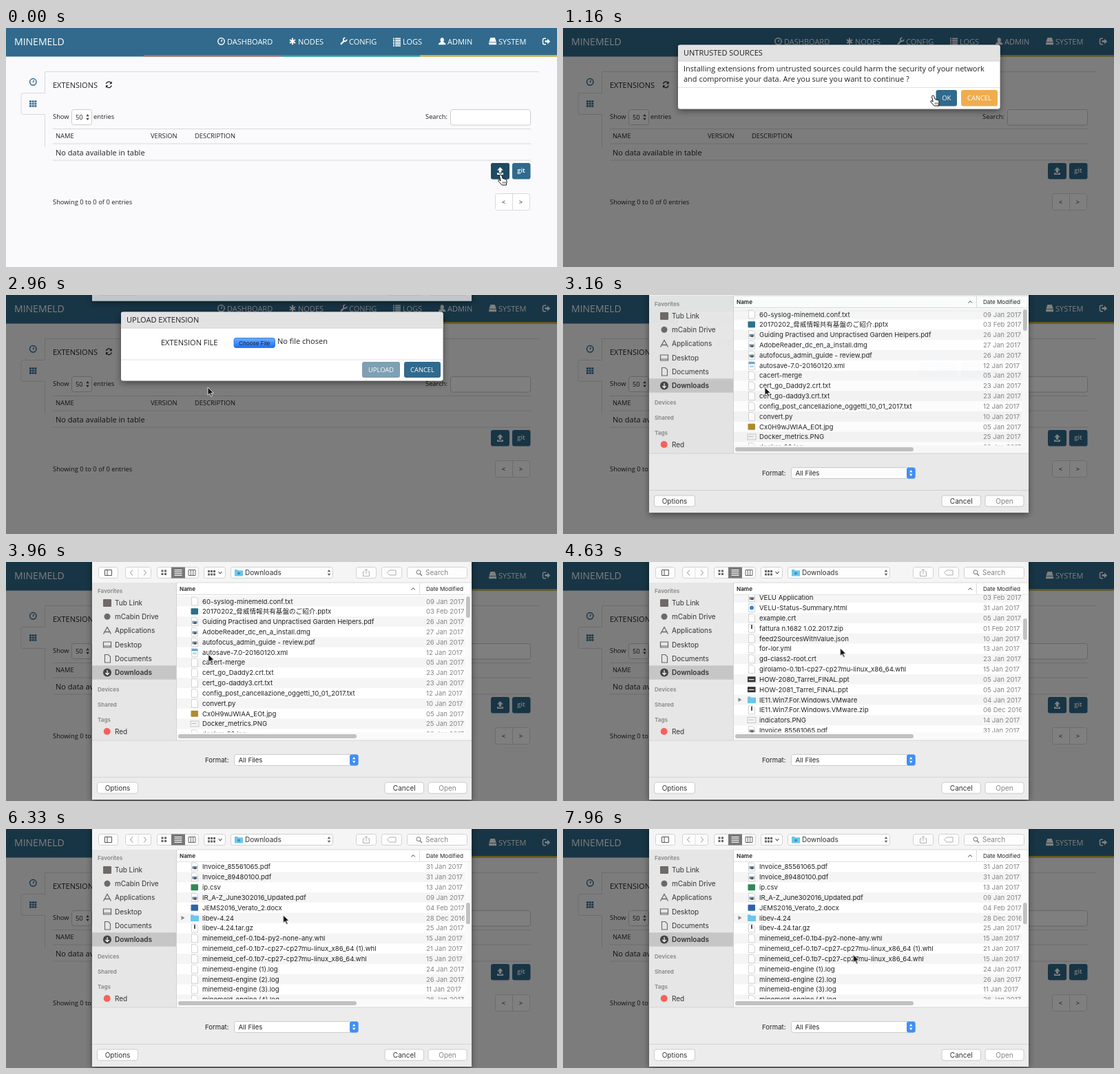
These frames come from a looping animation (800x347 px, 8000 ms). An HTML page:

```html
<!DOCTYPE html>
<html lang="en">
<head>
<meta charset="utf-8">
<title>Extension upload</title>
<style>
@property --scroll { syntax: '<number>'; inherits: true; initial-value: 0; }
html, body { margin: 0; width: 100%; height: 100%; overflow: hidden; background: #fafafc; }
svg { display: block; width: 100vw; height: 100vh; }
text { font: 9.35px 'Open Sans', sans-serif; fill: #222; white-space: pre; }
.big { font-size: 11px; }
.brand { font-size: 14px; }
.white { fill: #fff; }
.mac { font: 9.6px Inter, 'Noto Sans CJK JP', 'Noto Sans CJK', sans-serif; }
.side { font-size: 10px; fill: #333; }
.head { font-size: 8.15px; }
.bold { font-weight: 600; }
.grey { fill: #858585; }
.mid { text-anchor: middle; }
.anim { animation: 8s linear infinite; }

#hover { animation-name: hover; }
@keyframes hover { 0%, 4.5% { opacity: 1 } 6%, 100% { opacity: 0 } }
#shade { animation-name: shade; }
@keyframes shade {
  0%, 4% { opacity: 0 } 6%, 15.7% { opacity: 1 }
  18%, 19.5% { opacity: 0 } 21.5%, 100% { opacity: 1 }
}
#warn { animation-name: warn; }
@keyframes warn {
  0%, 5% { opacity: 0; transform: translateY(-87px); animation-timing-function: ease-out }
  9%, 15% { opacity: 1; transform: none; animation-timing-function: ease-out }
  18%, 100% { opacity: 0; transform: translateY(-87px) }
}
#upload { animation-name: upload; }
@keyframes upload {
  0%, 19.8% { opacity: 0; transform: translateY(-87px); animation-timing-function: ease-out }
  23.6%, 100% { opacity: 1; transform: none }
}
#pressed { animation-name: pressed; }
@keyframes pressed { 0%, 29% { opacity: 0 } 29.01%, 100% { opacity: 1 } }
#sheet { animation-name: sheet; }
@keyframes sheet {
  0%, 36% { transform: translateY(-360px); opacity: .8 }
  36.01% { transform: translateY(-346px); opacity: .8 }
  37% { transform: translateY(-337px); opacity: .8; animation-timing-function: cubic-bezier(.35, .25, .35, 1) }
  40.75%, 100% { transform: none; opacity: 1 }
}
#list { animation-name: scroll; }
@keyframes scroll {
  0%, 55.5% { --scroll: 0 }
  57.875% { --scroll: 242.3; animation-timing-function: ease-out }
  62.5%, 65.5% { --scroll: 300 }
  67% { --scroll: 338.1; animation-timing-function: ease-out }
  68.75%, 76.75% { --scroll: 352; animation-timing-function: ease-out }
  79.125%, 100% { --scroll: 432.1 }
}
#rows { transform: translateY(calc(var(--scroll) * -1px)); }
#thumb { transform: translateY(calc(var(--scroll) * .132px)); }
#cursor { animation-name: cursor; animation-timing-function: ease-in-out; }
@keyframes cursor {
  0%, 5% { transform: translate(718px, 213px) }
  13.5%, 19% { transform: translate(537px, 98px) }
  24.25% { transform: translate(413px, 84px) }
  28%, 31% { transform: translate(352px, 66px) }
  34.5%, 35% { transform: translate(281px, 122px) }
  37%, 49.25% { transform: translate(293px, 134px) }
  53.75%, 83% { transform: translate(402.5px, 125px) }
  90.75%, 98% { transform: translate(413px, 156px) }
  99.5%, 100% { transform: translate(421.5px, 182.5px) }
}
#hand { animation-name: hand; }
@keyframes hand { 0%, 5% { opacity: 1 } 5.01%, 12.5% { opacity: 0 } 12.51%, 17% { opacity: 1 } 17.01%, 100% { opacity: 0 } }
#arrow { animation-name: arrow; }
@keyframes arrow { 0%, 5% { opacity: 0 } 5.01%, 12.5% { opacity: 1 } 12.51%, 17% { opacity: 0 } 17.01%, 100% { opacity: 1 } }
</style>
</head>
<body>
<svg id="stage" viewBox="0 0 800 347" preserveAspectRatio="none"></svg>
<script>
const BLUE = '#316a8c', INK = '#222', LINE = '#d9d9dc';
const text = (x, y, s, cls = '') => `<text x="${x}" y="${y}" class="${cls}">${s}</text>`;
const rect = (x, y, w, h, fill, extra = '') =>
  `<rect x="${x}" y="${y}" width="${w}" height="${h}" fill="${fill}" ${extra}/>`;
const box = (x, y, w, h, r = 3, fill = '#fff', stroke = '#ccc') =>
  rect(x + .5, y + .5, w - 1, h - 1, fill, `rx="${r}" stroke="${stroke}"`);
const path = (d, stroke, width = 1, fill = 'none') =>
  `<path d="${d}" stroke="${stroke}" stroke-width="${width}" fill="${fill}"/>`;
const solid = (d, fill) => `<path d="${d}" fill="${fill}"/>`;
const circle = (x, y, r, fill, extra = '') => `<circle cx="${x}" cy="${y}" r="${r}" fill="${fill}" ${extra}/>`;
const group = (id, inner, attrs = '') => `<g id="${id}" class="anim" ${attrs}>${inner}</g>`;
const button = (x, y, w, h, label, fill) =>
  rect(x, y, w, h, fill, 'rx="3"') + text(x + w / 2, y + h / 2 + 3.4, label, 'white mid');
const updown = (x, y, c) => solid(`M${x - 2.3} ${y - 1.2}h4.6l-2.3-3.2zM${x - 2.3} ${y + 1.2}h4.6l-2.3 3.2z`, c);
const gauge = (x, y, c) => circle(x, y, 4.7, 'none', `stroke="${c}" stroke-width="1.5"`) +
  path(`M${x} ${y + 1}l1.2-3.6`, c, 1.3);
const uploadIcon = solid('M717.5 202l4.3 4.6h-2.6v3.4h-3.4v-3.4h-2.6zM713 210.3h2v1h5v-1h2v2.7h-9z', '#fff');

function header() {
  const items = [[321, 'DASHBOARD'], [424, 'NODES'], [498, 'CONFIG'], [576, 'LOGS'], [641, 'ADMIN'], [715, 'SYSTEM']];
  let out = rect(0, 0, 800, 41.5, BLUE);
  [[200, '#bd6a64'], [400, '#2ba59a'], [601, '#e6bd2f']].forEach(([x, c]) => out += rect(x, 39.3, 200.5, 2.2, c));
  out += text(12, 25, 'MINEMELD', 'brand white') + items.map(([x, s]) => text(x, 23.5, s, 'big white')).join('');
  out += gauge(312.5, 19.3, '#fff');
  out += path('M416 14.6v9.6M412 17l8 4.8M420 17l-8 4.8', '#fff', 2);
  out += path('M486 23.6l5.4-5.4', '#fff', 2.3) + path('M494.8 16.6a2.5 2.5 0 1 1-2.3-2.3', '#fff', 1.8);
  for (let y = 14.5; y < 25; y += 2.6) out += rect(562, y, 2, 1.7, '#fff') + rect(565, y, 8, 1.7, '#fff');
  out += solid('M633.2 14a2.8 3.2 0 0 1 1.3 6q4 1.2 4 4.3h-10.6q0-3.1 4-4.3a2.8 3.2 0 0 1 1.3-6z', '#fff');
  out += solid('M703.4 14h6.4l2 6h-10.4zM701.2 20.7h10.8v3.6h-10.8z', '#fff');
  return out + path('M784 15.2h-2.5q-2 0-2 2v4.5q0 2 2 2h2.5', '#fff', 1.5) +
    solid('M782.5 18h3.6v-2.6l4 4-4 4v-2.6h-3.6z', '#fff');
}

function page() {
  let out = rect(0, 0, 800, 347, '#fafafc') + header();
  out += path('M774 63.5H56.5V94.5H25q-3 0-3 3v25q0 3 3 3h31.5V173', LINE);
  out += gauge(39.3, 78.3, BLUE);
  for (let i = 0; i < 9; i++) out += rect(34 + i % 3 * 3.7, 105.3 + (i / 3 | 0) * 3.4, 2.9, 2.6, BLUE);
  out += text(68, 86.5, 'EXTENSIONS', 'big');
  out += path('M145.4 81.2a4 4 0 0 1 7-1.8M153.2 83.4a4 4 0 0 1-7 1.8', INK, 1.3) +
    solid('M153.7 77.5v3.7h-3.7zM144.9 87v-3.7h3.7z', INK);
  out += text(68, 132, 'Show') + box(95, 118, 30, 23) + text(101, 132.7, '50') + updown(118.5, 129.5, '#444') + text(127, 132, 'entries');
  out += text(609, 132, 'Search:') + box(645, 118, 117, 23.5);
  out += path('M68 146.5H762M68 168H762M68 192H762', LINE);
  out += text(72, 160, 'NAME') + text(210, 160, 'VERSION') + text(274, 160, 'DESCRIPTION');
  out += text(72, 184.5, 'No data available in table', 'big');
  out += rect(704, 196, 27, 23.5, BLUE, 'rx="3"') + group('hover', rect(704, 196, 27, 23.5, '#1f4a63', 'rx="3"')) + uploadIcon;
  out += rect(735, 196, 26.5, 23.5, BLUE, 'rx="3"') + text(748, 210, 'git', 'white mid bold');
  out += text(68, 255.5, 'Showing 0 to 0 of 0 entries') + box(710, 240, 51, 25, 3, '#fff', LINE) + path('M735.5 240v25', LINE);
  return out + text(722.5, 256, '&lt;', 'mid') + text(747.5, 256, '&gt;', 'mid');
}

function modal(h, title) {
  return rect(167, 24.5, 467.5, h, '#fff', 'rx="3" filter="url(#soft)"') +
    rect(167, 25, 467.5, 23, '#e2e2e3', 'rx="2"') + path('M167 48H634.5', '#d0d0d0') +
    text(175, 40, title, 'big');
}
const warning = () => modal(93, 'UNTRUSTED SOURCES') +
  text(175, 63, 'Installing extensions from untrusted sources could harm the security of your network', 'big') +
  text(175, 78, 'and compromise your data. Are you sure you want to continue ?', 'big') +
  path('M167 86.5H634.5', '#e2e2e2') +
  button(541.5, 90, 30.5, 23.5, 'OK', BLUE) + button(578, 90, 53, 23.5, 'CANCEL', '#f0ad4e');
const uploader = () => modal(100, 'UPLOAD EXTENSION') + text(225, 73, 'EXTENSION FILE', 'big') +
  box(331, 62, 59, 14.5, 3, '#f6f6f6', '#bbb') +
  group('pressed', rect(331, 62.5, 59.5, 14, 'url(#press)', 'rx="3" stroke="#2265cf" stroke-width=".7"')) +
  text(360.7, 72.7, 'Choose File', 'mac head mid') + text(394, 71.3, 'No file chosen', 'big') +
  path('M167 94H634.5', '#e2e2e2') +
  button(517, 97, 55, 23, 'UPLOAD', '#7f9fb3') + button(578, 97, 53, 23, 'CANCEL', BLUE);

// kind | name | day and month (2017 unless a year is given)
const FILES = `t|60-syslog-minemeld.conf.txt|09 Jan
#27708a|20170202_脅威情報共有基盤のご紹介.pptx|03 Feb
p|Guiding Practised and Unpractised Garden Helpers.pdf|26 Jan
p|AdobeReader_dc_en_a_install.dmg|27 Jan
p|autofocus_admin_guide - review.pdf|26 Jan
x|autosave-7.0-20160120.xml|12 Jan
t|cacert-merge|05 Jan
t|cert_go_Daddy2.crt.txt|23 Jan
t|cert_go-daddy3.crt.txt|23 Jan
t|config_post_cancellazione_oggetti_10_01_2017.txt|12 Jan
t|convert.py|10 Jan
#b08a2c|Cx0H9wJWIAA_EOt.jpg|05 Jan
i|Docker_metrics.PNG|25 Jan
t|docker-00.log|26 Jan
t|domains.txt|19 Jan
t|endpoints.json|11 Jan
p|VELU Application|03 Feb
c|VELU-Status-Summary.html|31 Jan
t|example.crt|05 Jan
z|fattura n.1682 1.02.2017.zip|01 Feb
t|feed2SourcesWithValue.json|10 Jan
t|for-lor.yml|13 Jan
t|gd-class2-root.crt|23 Jan
t|girolamo-0.1b1-cp27-cp27mu-linux_x86_64.whl|15 Jan
s|HOW-2080_Tarrel_FINAL.ppt|05 Jan
s|HOW-2081_Tarrel_FINAL.ppt|05 Jan
d|IE11.Win7.For.Windows.VMware|04 Jan
z|IE11.Win7.For.Windows.VMware.zip|06 Dec 2016
i|indicators.PNG|14 Jan
p|Invoice_85561065.pdf|31 Jan
p|Invoice_89480100.pdf|31 Jan
#2f8a55|ip.csv|13 Jan
p|IR_A-Z_June302016_Updated.pdf|09 Jan
#2f62ad|JEMS2016_Verato_2.docx|04 Feb
d|libev-4.24|28 Dec 2016
z|libev-4.24.tar.gz|25 Jan
t|minemeld_cef-0.1b4-py2-none-any.whl|15 Jan
t|minemeld_cef-0.1b7-cp27-cp27mu-linux_x86_64 (1).whl|21 Jan
t|minemeld_cef-0.1b7-cp27-cp27mu-linux_x86_64.whl|15 Jan
t|minemeld-engine (1).log|24 Jan
t|minemeld-engine (2).log|26 Jan
t|minemeld-engine (3).log|11 Jan
t|minemeld-engine (4).log|26 Jan
t|minemeld-engine (5).log|26 Jan`.split('\n').map(l => l.split('|'));

const folder = (x, y) => solid(`M${x} ${y - 4.5}h4l1 1.2h7v8.3h-12z`, '#6cc5ec');
function fileIcon(kind, y) {
  if (kind[0] === '#') return rect(268.5, y - 4.5, 10.5, 9, kind, 'rx="1"');
  if (kind === 'd') return folder(268, y) + solid(`M254.5 ${y - 3}l5 3-5 3z`, '#888');
  if (kind === 's') return rect(268, y - 4, 11.5, 8, '#333') + rect(269.5, y - .5, 8, 1.5, '#ddd');
  if (kind === 'i') return rect(268, y - 4, 12, 8, '#f4f4f4', 'stroke="#aaa" stroke-width=".6"') + rect(269.5, y - 1, 7, 1, '#bbb');
  let out = path(`M269.5 ${y - 6}h6l3 3v9h-9z`, '#c0c0c0', .7, '#fff');
  if (kind === 'p') out += rect(270.5, y - 1, 7, 4, '#7a8ea6') + circle(274.5, y + 2, 1.6, '#455');
  if (kind === 'x') out += rect(269.5, y - 5, 9, 3, '#55a5d8') + rect(271, y, 6, 3, '#bcd9ea');
  if (kind === 'c') out += circle(274, y, 3, '#2e86d6');
  if (kind === 'z') out += rect(273, y - 5, 2, 6, '#555');
  return out;
}
const rows = () => FILES.map(([kind, name, date], i) => {
  const y = 57 + i * 14.83;
  const stripe = i % 2 ? '' : rect(248, y - 7.4, 420, 14.83, '#f5f5f5');
  return stripe + fileIcon(kind, y) + text(285, y + 3.5, name, 'mac') +
    `<g clip-path="url(#dates)">${text(610, y + 3.5, date.length > 6 ? date : date + ' 2017', 'mac grey')}</g>`;
}).join('');

function toolbar() {
  const seg = (x, w) => box(x, 7, w, 17, 3, '#fdfdfd', '#d2d2d2');
  let out = seg(134, 29) + seg(173, 38) + seg(219, 61) + seg(287, 32) + seg(326, 149) + seg(508, 30) + seg(545, 30) + seg(582, 88);
  out += path('M192 7.5v16', '#ddd') + rect(240, 7.5, 20, 16, '#777') + path('M143.5 11.5h10v8h-10zM147 11.5v8', '#555');
  out += path('M184 11.5l-3.5 4 3.5 4M200 11.5l3.5 4-3.5 4', '#aaa', 1.1);
  for (let i = 0; i < 4; i++) out += rect(225.5 + i % 2 * 4.5, 11.5 + (i >> 1) * 4.5, 3, 3, '#666') + rect(244.5, 11 + i * 2.6, 11, 1.1, '#fff');
  out += path('M265 11.5h10v8h-10zM268.3 11.5v8M271.7 11.5v8', '#666');
  for (let i = 0; i < 6; i++) out += rect(293 + i % 3 * 4, 12 + (i / 3 | 0) * 4.5, 3, 3, '#666');
  out += path('M308.5 14l2.5 2.8 2.5-2.8', '#555', 1.1) + folder(332, 15.5) + circle(338, 16.5, 2, '#3b94c0');
  out += text(347, 19, 'Downloads', 'mac side') + updown(469, 15.5, '#666');
  out += path('M520.5 14h-2v6.5h9V14h-2M523 17.5v-7l-2.3 2.2M523 10.5l2.3 2.2', '#b0b0b0');
  out += path('M553.5 15.5l3.5-3.5h9v7h-9z', '#b0b0b0');
  return out + circle(599, 14.8, 3, 'none', 'stroke="#777"') + path('M601 17l3 3', '#777', 1.2) + text(609, 19, 'Search', 'mac side grey');
}

function sidebar() {
  let out = rect(125, 30, 122, 229, '#e6e6e6') + rect(125, 150.3, 122, 20.3, '#c6c6c6') + path('M247.5 30v229', '#d2d2d2');
  [['Favorites', 45], ['Devices', 188.3], ['Shared', 210.3], ['Tags', 232.3]].forEach(([s, y]) => out += text(133, y, s, 'mac head bold grey'));
  ['Tub Link', 'mCabin Drive', 'Applications', 'Desktop', 'Documents', 'Downloads'].forEach((s, i) =>
    out += text(158, 62.7 + i * 20.3, s, 'mac side' + (i === 5 ? ' bold' : '')));
  out += rect(141, 54, 12, 11, '#6f6a68', 'rx="1"');
  out += circle(147, 79.3, 4.5, '#6a6a6a');
  out += path('M141.5 104.5l5.5-10 5.5 10M143 101.5h8', '#666', 1.3);
  out += path('M141.5 116h11v8h-11zM141.5 122h11', '#666', 1.2);
  out += path('M143.5 134.5h5l3 3v8.5h-8z', '#666', 1.1);
  out += circle(147, 160.5, 6, '#444') + path('M147 157v6.5M144.3 161l2.7 2.7 2.7-2.7', '#fff', 1.2);
  return out + circle(146.7, 246, 5, '#f95f58') + text(158, 249.5, 'Red', 'mac side');
}

function sheet() {
  const macButton = (x, w, label, cls = '') => box(x, 319.5, w, 17, 3, '#fff', '#ccc') + text(x + w / 2, 331.7, label, 'mac side mid ' + cls);
  let out = rect(125, -8, 551, 353, '#ececec', 'filter="url(#soft)"') + rect(125, 0, 551, 30, '#f5f5f5') + toolbar() + sidebar();
  out += rect(248, 30, 428, 229, '#fff') + text(252, 42, 'Name', 'mac head bold') + path('M588.5 40.5l2.7-2.8 2.7 2.8', '#444') + path('M600.5 31v16', '#ddd');
  out += text(610, 42, 'Date Modified', 'mac head') + path('M248 30H676M248 47.3H676', '#d9d9d9');
  out += group('list', `<g clip-path="url(#files)"><g id="rows">${rows()}</g></g>` +
    rect(666, 47.5, 10, 211, '#fafafa') + `<g id="thumb">${rect(668, 50, 5.8, 31, '#c1c1c1', 'rx="2.9"')}</g>`);
  out += rect(248, 247.5, 428, 11.5, '#fafafa') + rect(250, 250, 259, 6, '#c1c1c1', 'rx="3"') + path('M125 259H676M125 312.5H676', '#d5d5d5');
  out += text(289, 291, 'Format:', 'mac') + box(331, 279, 181, 17) + text(337.5, 291, 'All Files', 'mac');
  out += rect(499, 279.5, 12.5, 16, '#3f8ff5', 'rx="3"') + updown(505.2, 287.5, '#fff');
  return out + macButton(132, 60, 'Options') + macButton(549.5, 57.5, 'Cancel') + macButton(612.5, 57, 'Open', 'grey');
}

const cursor = () =>
  group('hand', path('M-1.5 1.8Q-1.2 0 .2 0T2 1.8L3.2 5.5 8 6.7Q9.4 7.5 9 10L8.4 15H2.2L-3 9.6Q-3.8 7.8-2 7.6L.2 9z', '#111', 1, '#fff') +
    path('M3.3 10v3M5.2 10v3M7 10v3', '#333', .7)) +
  group('arrow', path('M0 0V11.5L2.7 9 4.7 13.4 6.6 12.5 4.7 8.3H8.4z', '#fff', .8, '#111'));

document.getElementById('stage').innerHTML = `<defs>
  <filter id="soft" x="-10%" y="-20%" width="120%" height="150%"><feDropShadow dx="0" dy="3" stdDeviation="5" flood-opacity=".45"/></filter>
  <linearGradient id="press" x2="0" y2="1"><stop stop-color="#6cb0fb"/><stop offset="1" stop-color="#1a6df5"/></linearGradient>
  <clipPath id="files">${rect(248, 47.8, 418, 199.7, '#000')}</clipPath>
  <clipPath id="dates">${rect(600, 0, 65.5, 800, '#000')}</clipPath>
</defs>` + page() + group('shade', rect(0, 0, 800, 347, '#000', 'fill-opacity=".5"')) +
  group('warn', warning()) + group('upload', uploader()) + group('sheet', sheet()) + group('cursor', cursor());
</script>
</body>
</html>
```
